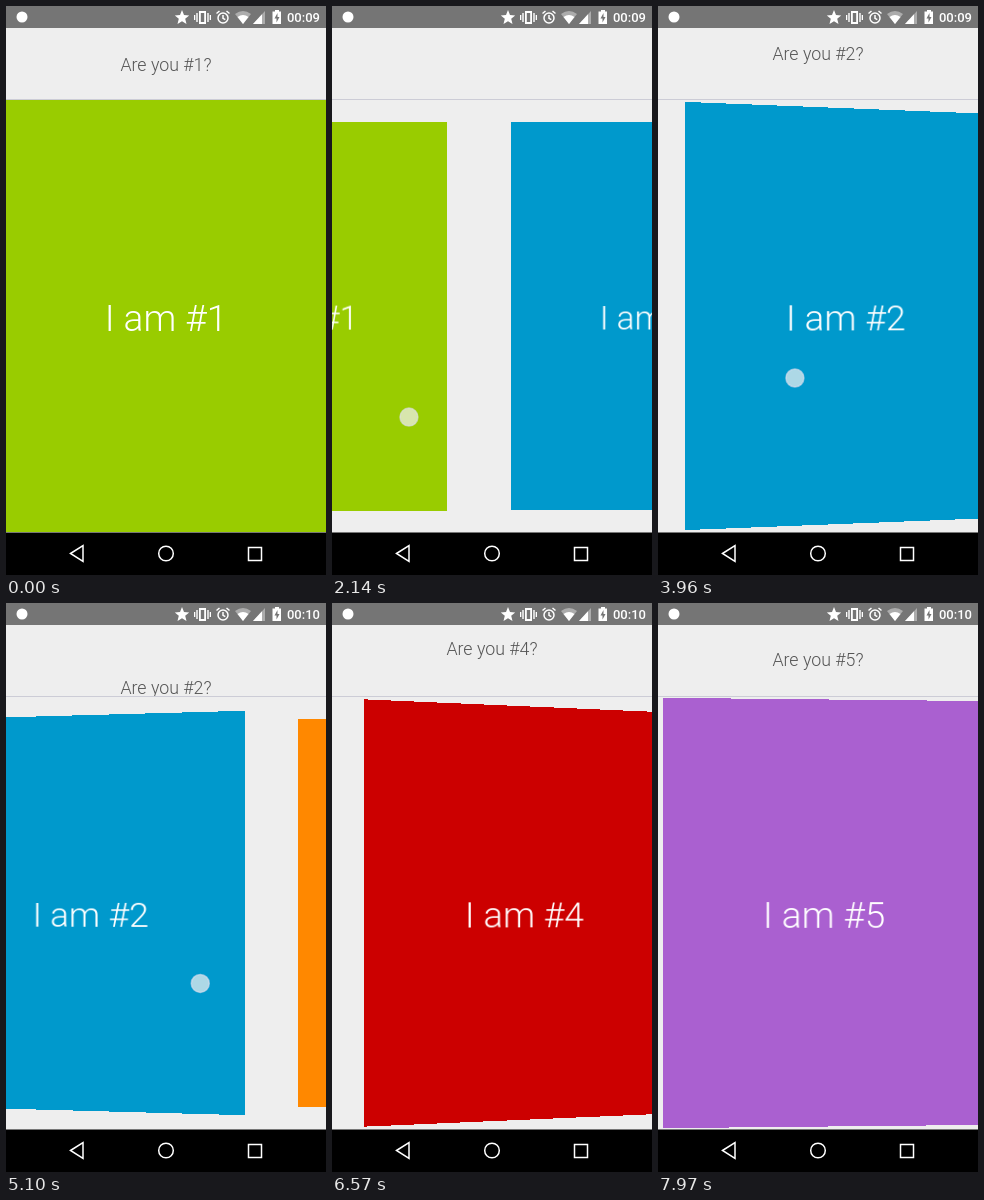
An HTML page that plays this animation: 320x569 px, repeating every 7990 ms.

```html
<!DOCTYPE html>
<html lang="en">
<head>
<meta charset="utf-8">
<title>Pager with header</title>
<style>
html, body { margin: 0; width: 100%; height: 100%; overflow: hidden; }
body { position: relative; background: #eee; font-family: Roboto, sans-serif; font-weight: 300; text-align: center; }
#header { position: absolute; left: 0; top: 22px; width: 320px; height: 71px; overflow: hidden; border-bottom: 1.5px solid #ccccd6; }
#header div { position: absolute; top: 1px; width: 320px; line-height: 72px; font-size: 17.8px; color: #555; }
#pages { position: absolute; left: 0; top: 94px; width: 320px; height: 432px; }
#pages div { position: absolute; width: 320px; height: 432px; line-height: 437px; font-size: 37px; color: #fff; }
svg { position: absolute; left: 0; top: 0; }
</style>
</head>
<body>
<div id="header"></div>
<div id="pages"></div>
<svg width="320" height="569" viewBox="0 0 320 569">
  <rect width="320" height="22" fill="#757575"/>
  <rect y="526.5" width="320" height="43"/>
  <g fill="#fff">
    <circle cx="16" cy="11" r="5.5"/>
    <path d="M176 4l2 5 5.200.4-4 3.400 1.300 5.200-4.500-2.800-4.500 2.800 1.300-5.200-4-3.400 5.200-.4z"/>
    <path d="M193 5h7v13h-7zM190.300 7h1.400v9h-1.400zM201.300 7h1.400v9h-1.400zM188 9h1.300v5h-1.300zM203.700 9h1.300v5h-1.300z"/>
    <path d="M229 8q8-6 16 0l-8 10z" fill-opacity=".4"/>
    <path d="M231.500 11q5.500-4 11 0l-5.500 7z"/>
    <path d="M259 5v13h-12z" fill-opacity=".4"/>
    <path d="M256 8.300v9.700h-9z"/>
    <path d="M269 4h4v1.500h2v12.500h-8.500v-12.500h2.500z"/>
    <text id="clock" x="297.500" y="16" font-size="13" font-weight="500" text-anchor="middle"></text>
  </g>
  <path d="M271.500 7l-3 5.500h2v4l3-5.500h-2z" fill="#757575"/>
  <rect x="194.800" y="7" width="3.400" height="9" fill="#757575"/>
  <g fill="none" stroke="#fff" stroke-width="1.500">
    <circle cx="217" cy="12" r="5"/>
    <path d="M217 9v3.300l2.300 1.400M210.500 7.500l3-2.500M223.500 7.500l-3-2.500"/>
    <path d="M64.500 547.500l12.500-8v16z"/>
    <circle cx="160" cy="547.500" r="7.300"/>
    <rect x="242.500" y="541.500" width="13" height="13"/>
  </g>
  <circle id="touch" r="9" fill="#f0f0f0" fill-opacity=".72" stroke="#dde" stroke-opacity=".6" stroke-width="1.500"/>
</svg>
<script>
const LOOP = 7990, STEP = 352, SETTLE = 600, BAND = 0.27, TILT = 15;
const $ = id => document.getElementById(id);

// Each stroke: where the pager rests afterwards, then [time, page, touch x, touch y]
const strokes = [
  [0.6, [500, 0, 268, 385], [560, 0, 264, 387], [1350, 0.3, 160, 404], [2350, 0.6, 55, 413]],
  [1, [2500, 0.6, 258, 385], [2650, 0.61, 245, 380], [2990, 0.6875, 208, 373], [3960, 0.919, 137, 372], [4120, 0.95, 124, 372]],
  [2, [4610, 1, 272, 366], [4700, 1, 268, 367], [5050, 1.17, 210, 378], [5400, 1.48, 102, 395]],
  [3, [5930, 2, 280, 368], [6010, 2, 264, 368], [6120, 2.053, 244, 370], [6420, 2.6, 60, 412]],
  [4, [7000, 3, 276, 365], [7080, 3, 274, 366], [7420, 3.2045, 202, 380], [7700, 3.64, 48, 414]]
];

const views = ['#99cc00', '#0099cc', '#ff8800', '#cc0000', '#aa60d0'].map((color, i) => {
  const add = (parent, text) => {
    const el = $(parent).appendChild(document.createElement('div'));
    el.textContent = text;
    return el;
  };
  const page = add('pages', `I am #${i + 1}`);
  page.style.background = color;
  return { page, title: add('header', `Are you #${i + 1}?`) };
});

function stateAt(t) {
  const stroke = strokes.filter(s => s[1][0] <= t).pop();
  if (!stroke) return { pos: 0 };
  const [rest, ...keys] = stroke;
  const last = keys[keys.length - 1];
  if (t >= last[0]) {
    const left = 1 - Math.min(1, (t - last[0]) / SETTLE);
    return { pos: rest + (last[1] - rest) * left ** 5 };
  }
  const i = keys.findIndex(k => k[0] > t);
  const a = keys[i - 1], b = keys[i];
  const f = (t - a[0]) / (b[0] - a[0]);
  const [, pos, x, y] = a.map((v, k) => v + (b[k] - v) * f);
  return { pos, x, y };
}

function draw(t) {
  const { pos, x, y } = stateAt(t);
  views.forEach(({ page, title }, i) => {
    const off = i - pos;
    const shown = Math.abs(off) < 1 ? 'visible' : 'hidden';
    const k = Math.min(1, Math.abs(off) / BAND);
    const angle = Math.sign(off) * TILT * Math.sin(Math.PI * k);
    page.style.visibility = title.style.visibility = shown;
    page.style.transform = `translateX(${off * STEP}px) perspective(1138px) rotateY(${angle}deg) ` +
      `scale(${1 - 0.1 * k ** 4}, ${1 - 0.1 * k ** 0.8})`;
    title.style.transform = `translateY(${-off * (off > 0 ? 138 : 122)}px)`;
  });
  $('touch').setAttribute('visibility', x === undefined ? 'hidden' : 'visible');
  if (x !== undefined) $('touch').setAttribute('transform', `translate(${x} ${y})`);
  $('clock').textContent = t < 5000 ? '00:09' : '00:10';
}

const start = performance.now();
function tick() {
  draw((performance.now() - start) % LOOP);
  requestAnimationFrame(tick);
}
tick();
</script>
</body>
</html>
```
